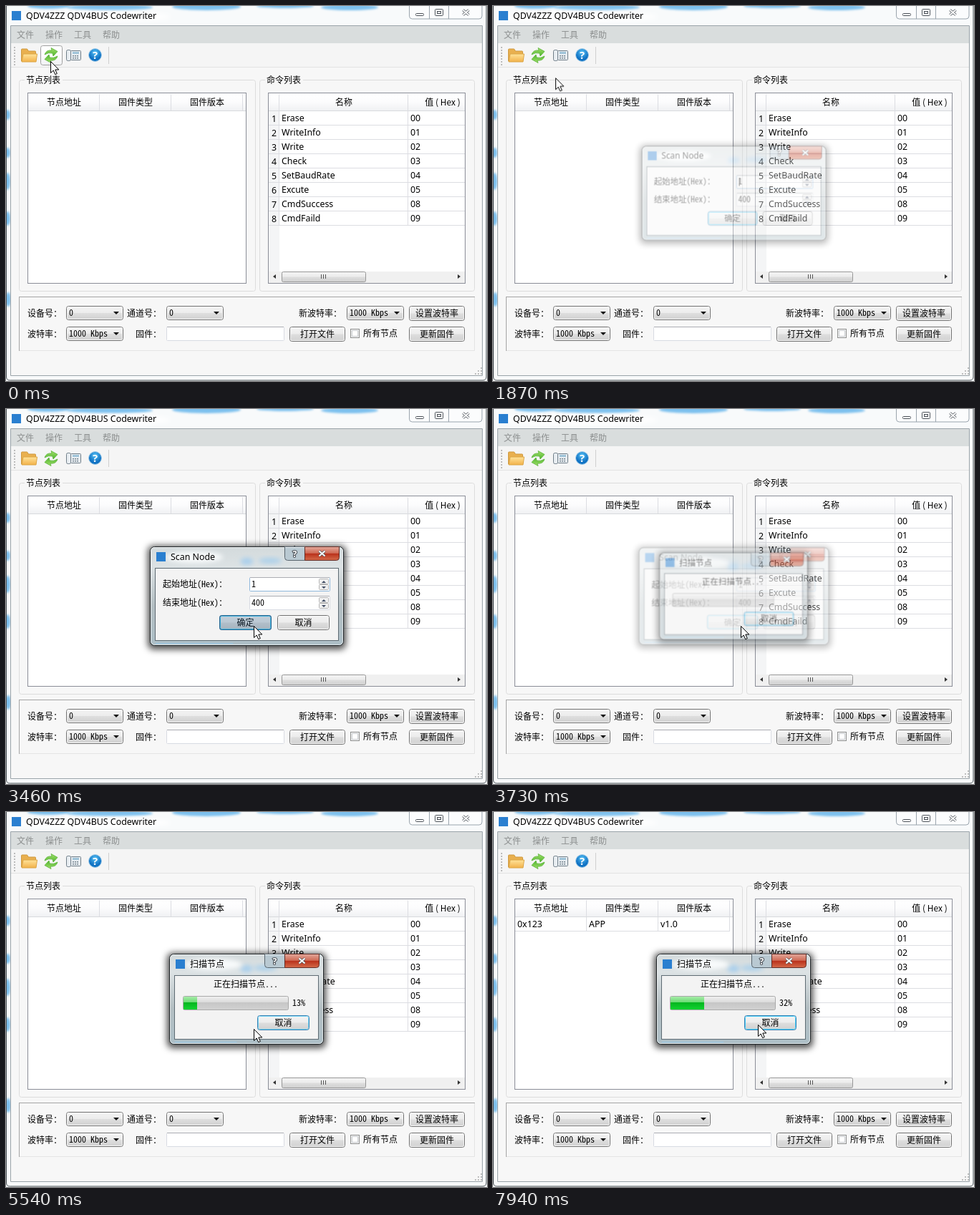
Animation of 672 by 524 pixels, one loop 8 s. Source, as an HTML page:

```html
<!DOCTYPE html>
<html lang="zh-CN">
<head>
<meta charset="utf-8">
<title>Node scan</title>
<style>
html, body { margin: 0; width: 100%; height: 100%; overflow: hidden; background: #fff; }
svg { display: block; width: 672px; height: 524px; }
text { font: 12.4px "Noto Sans", "Noto Sans CJK SC", sans-serif; fill: #000; white-space: pre; }
text.cn { font: 12px "Noto Sans CJK SC", "Noto Sans CJK", sans-serif; }
text.mono { font: 12px "Noto Sans Mono CJK SC", "Noto Sans CJK SC", "Noto Sans Mono", monospace; }
text.off { fill: #8c8f8f; }
text.mid { text-anchor: middle; }

.active, .hover, .pressed, .scan, .busy, .row, .caret, .down, .pulse, #cursor { animation: 8s linear infinite; }
.active { animation-name: active; }
.hover { animation-name: hover; }
.pressed { animation-name: pressed; }
.scan { animation-name: scan; transform-origin: 336px 261px; }
.busy { animation-name: busy; transform-origin: 336px 261px; }
.row { animation-name: row; }
.caret { animation-name: caret; }
.down { animation-name: down; }
.pulse { animation-name: pulse; }
#cursor { animation-name: cursor; }

@keyframes active {
  0%, 19.37% { opacity: 0; }
  19.375%, 22% { opacity: 1; }
  22.01%, 100% { opacity: 0; }
}
@keyframes hover { 0%, 19.37% { opacity: 1; } 19.375%, 100% { opacity: 0; } }
@keyframes pressed {
  0%, 19.37% { opacity: 0; }
  19.375%, 21.87% { opacity: 1; }
  21.875%, 100% { opacity: 0; }
}
@keyframes scan {
  0%, 22.2% { opacity: 0; transform: scale(.92); }
  25.3%, 44.1% { opacity: 1; transform: none; }
  47.9%, 100% { opacity: 0; transform: scale(.97); }
}
@keyframes busy {
  0%, 45.2% { opacity: 0; transform: scale(.92); }
  48.1%, 100% { opacity: 1; transform: none; }
}
@keyframes row { 0%, 93.1% { opacity: 0; } 93.12%, 100% { opacity: 1; } }
@keyframes caret {
  0%, 26.74% { opacity: 1; }
  26.75%, 33.39% { opacity: 0; }
  33.4%, 39.99% { opacity: 1; }
  40%, 100% { opacity: 0; }
}
@keyframes down {
  0%, 42.49% { opacity: 0; }
  42.5%, 44% { opacity: 1; }
  44.01%, 100% { opacity: 0; }
}
@keyframes pulse { 0%, 48% { opacity: 1; } 54% { opacity: .5; } 61% { opacity: 1; } 67% { opacity: .5; } 72.75%, 100% { opacity: 1; } }
@keyframes cursor {
  0%, 8.62% { transform: translate(62px, 77px); }
  9%, 22.2% { transform: translate(62px, 74px); }
  27.5% { transform: translate(174px, 191px); }
  32% { transform: translate(300px, 273px); }
  35%, 95.1% { transform: translate(346px, 303px); }
  99.25%, 100% { transform: translate(370px, 297px); }
}
</style>
</head>
<body>
<svg id="stage" viewBox="0 0 672 524">
  <defs>
    <linearGradient id="face" x2="0" y2="1">
      <stop stop-color="#f4f4f4"/><stop offset=".48" stop-color="#ececec"/>
      <stop offset=".52" stop-color="#dedede"/><stop offset="1" stop-color="#d0d0d0"/>
    </linearGradient>
    <linearGradient id="head" x2="0" y2="1">
      <stop stop-color="#fff"/><stop offset=".5" stop-color="#fcfcfd"/><stop offset="1" stop-color="#f0f1f3"/>
    </linearGradient>
    <linearGradient id="glass" x2="0" y2="1">
      <stop stop-color="#d3dadc"/><stop offset=".2" stop-color="#dce2e4"/>
      <stop offset=".6" stop-color="#b4bfc3"/><stop offset="1" stop-color="#adbfc7"/>
    </linearGradient>
    <linearGradient id="lit">
      <stop stop-color="#c9dbe6"/><stop offset=".45" stop-color="#d9e4ea"/><stop offset="1" stop-color="#a9bac4"/>
    </linearGradient>
    <linearGradient id="menu" x2="0" y2="1">
      <stop stop-color="#f8f9fb"/><stop offset=".45" stop-color="#e8ebf2"/><stop offset="1" stop-color="#d9dee9"/>
    </linearGradient>
    <linearGradient id="red" x2="0" y2="1">
      <stop stop-color="#e3a89b"/><stop offset=".47" stop-color="#cf6a55"/>
      <stop offset=".5" stop-color="#b9301a"/><stop offset="1" stop-color="#d46b4a"/>
    </linearGradient>
    <linearGradient id="dip" x2="0" y2="1"><stop stop-color="#a2a4a2"/><stop offset="1" stop-color="#d4d6d4"/></linearGradient>
    <linearGradient id="green" x2="0" y2="1">
      <stop stop-color="#a8eba9"/><stop offset=".42" stop-color="#6bdc74"/>
      <stop offset=".46" stop-color="#04b51f"/><stop offset="1" stop-color="#12d330"/>
    </linearGradient>
    <linearGradient id="track" x2="0" y2="1">
      <stop stop-color="#f0f0f0"/><stop offset=".42" stop-color="#dcdcdc"/>
      <stop offset=".46" stop-color="#c6c6c6"/><stop offset="1" stop-color="#d2d2d2"/>
    </linearGradient>
    <linearGradient id="folder" x2="0" y2="1"><stop stop-color="#ffe39a"/><stop offset="1" stop-color="#f2b24a"/></linearGradient>
    <linearGradient id="leaf" x2="0" y2="1"><stop stop-color="#a4e06c"/><stop offset="1" stop-color="#4fb52e"/></linearGradient>
    <radialGradient id="ball" cy=".3"><stop stop-color="#57c1f5"/><stop offset="1" stop-color="#1173c4"/></radialGradient>
    <filter id="soft" x="-50%" y="-50%" width="200%" height="200%"><feGaussianBlur stdDeviation="3"/></filter>
    <filter id="mist" x="-50%" y="-50%" width="200%" height="200%"><feGaussianBlur stdDeviation="1.5"/></filter>
    <filter id="shade" x="-15%" y="-25%" width="130%" height="150%"><feGaussianBlur stdDeviation="5"/></filter>
    <clipPath id="edge"><path d="M0 0H672V524H0ZM7 28V516H666V28Z" clip-rule="evenodd"/></clipPath>
  </defs>
</svg>
<script>
const LOOP = 8000, SCAN_START = 3690, MS_PER_PERCENT = 132.5, BAR = 146;

const rect = (x, y, w, h, fill, stroke, r = 0, extra = '') =>
  `<rect x="${x}" y="${y}" width="${w}" height="${h}" rx="${r}" fill="${fill}"${stroke ? ` stroke="${stroke}"` : ''} ${extra}/>`;
// Outlined box whose one-pixel border covers the outermost pixels
const box = (x, y, w, h, fill, stroke, r) => rect(x + .5, y + .5, w - 1, h - 1, fill, stroke, r);
const path = (d, fill = 'none', stroke = 'none', extra = '') => `<path d="${d}" fill="${fill}" stroke="${stroke}" ${extra}/>`;
const text = (x, y, s, cls = '') => `<text x="${x}" y="${y}" class="${cls}">${s}</text>`;
const group = (cls, ...parts) => `<g class="${cls}">${parts.join('')}</g>`;
const hline = (x, y, w, c) => rect(x, y, w, 1, c);
const vline = (x, y, h, c) => rect(x, y, 1, h, c);
const blob = (x, y, rx, ry, c, filter = 'soft') =>
  `<ellipse cx="${x}" cy="${y}" rx="${rx}" ry="${ry}" fill="${c}" filter="url(#${filter})"/>`;
const tri = (x, y, s, c = '#111') => path(`M${x - s} ${y}h${2 * s}l${-s} ${s}z`, c);
const appIcon = (x, y) => rect(x, y, 13, 13, '#2a7fd0');

const button = (x, y, w, label, focus) =>
  box(x, y, w, 21, 'url(#face)', focus ? '#3c7fb1' : '#707070', 3) +
  rect(x + 1.5, y + 1.5, w - 3, 18, 'none', focus ? '#48d0fa' : '#fafafa', 2, focus ? 'class="pulse"' : '') +
  text(x + w / 2, y + 15, label, 'cn mid');
const combo = (x, y, label) =>
  box(x, y, 80, 20, 'url(#face)', '#707070', 3) + rect(x + 1.5, y + 1.5, 77, 17, 'none', '#f8f8f8', 2) +
  text(x + 4, y + 14, label, 'mono') + tri(x + 66 + 4, y + 8, 4);
const field = (x, y, w, h, edge = '#d8dbe2') =>
  box(x, y, w, h, '#fff', edge, 1) + hline(x + 1, y, w - 2, '#abadb3');
const spin = (y, value, edge) =>
  field(340, y, 113, 20, edge) + text(343, y + 14, value, 'mono') +
  [0, 8].map(d => box(437, y + 2 + d, 14, 8, '#f1f1f1', '#b5b5b5', 1)).join('') +
  path(`M441 ${y + 8}h6l-3 -3z`, '#3f4b62') + tri(444, y + 13, 3, '#3f4b62');
const cross = (x, y) => {
  const d = `M${x - 4} ${y - 3.5}l8 7m0 -7l-8 7`;
  return path(d, 'none', '#4b5158', 'stroke-width="3.6"') + path(d, 'none', '#fff', 'stroke-width="2"');
};
const groupBox = (x, w, label) =>
  box(x, 103, w, 296, 'none', '#dcdcdc', 3) + rect(x + 8, 98, 53, 10, '#f7f7f7') + text(x + 10, 108, label, 'cn');

function frame() {
  const patches = [[60, 0, 30, 4], [145, 2, 60, 4], [280, 1, 48, 5], [390, 0, 40, 3], [480, 2, 40, 4],
    [2, 152, 4, 7], [2, 205, 4, 7], [2, 245, 4, 12], [2, 297, 4, 10], [3, 410, 4, 10]];
  const caption = (edge, close) =>
    path('M563.5 0V14q0 4 4 4H661q4 0 4 -4V0', '#ffffff60', edge) +
    (close ? path('M619 0V18H661q4 0 4 -4V0z', 'url(#red)', '#642f29') : '') +
    vline(591, 0, 18, edge) + vline(618, 0, 18, edge) +
    box(572, 10, 12, 4, '#fff', '#4b5158', 1) + box(599, 4, 12, 10, '#fff', '#4b5158', 1) + box(602, 7, 6, 4, '#eee', '#4b5158') +
    cross(642.5, 9);
  return rect(0, 0, 672, 524, '#f8fafb') +
    `<g clip-path="url(#edge)">` + patches.map(p => blob(...p, '#7cc0ee', 'mist')).join('') + blob(120, 15, 110, 7, '#fff') + '</g>' +
    caption('#9aa4ad') +
    group('active', `<g clip-path="url(#edge)">`, rect(0, 0, 672, 524, 'url(#lit)'), blob(120, 14, 110, 8, '#f4f8fa'),
      blob(275, 3, 35, 3, '#a4cbe2'), blob(480, 4, 45, 4, '#8ea4b2'), '</g>', caption('#59656e', true)) +
    path('M.5 0V518q0 5 5 5H666q5 0 5 -5V0', 'none', '#4a5257') + path('M6.5 516.5V27.5H665.5V516.5Z', '#f7f7f7', '#9aa3a9') +
    appIcon(8, 7) + text(28, 18, 'QDV4ZZZ QDV4BUS Codewriter');
}

function toolbar() {
  const menu = cls => ['文件', '操作', '工具', '帮助'].map((s, i) => text(15 + 40 * i, 45, s, cls)).join('');
  const arrow = path('M54 68q2 -7 10 -6l-1 -3.500l9 5l-6 6.500l-1 -4q-6 -1.500 -11 2z', 'url(#leaf)', '#58b336', 'stroke-width=".8"');
  let dots = '';
  for (let y = 57; y < 83; y += 4) dots += rect(11, y, 2, 2, '#bcbcbc');
  return rect(7, 28, 658, 24, '#d9dddd') + menu('cn off') +
    group('active', rect(7, 28, 658, 24, 'url(#menu)'), menu('cn')) +
    rect(7, 52, 658, 33, '#f5f5f5') + hline(7, 85, 658, '#e2e2e2') + dots + vline(143, 57, 24, '#cfcfcf') +
    group('hover', box(48, 55, 31, 28, 'url(#head)', '#a0a0a0', 3)) +
    group('pressed', box(48, 55, 31, 28, 'url(#dip)', '#676967', 3)) +
    path('M21.5 77V61q0 -1 1 -1h7l2 3h9q1 0 1 1V77z', '#e9b04f', '#cf9a40') +
    path('M22 78l2 -11H43.500l-1.500 11z', 'url(#folder)', '#dba445') +
    arrow + `<g transform="rotate(180 63 69)">${arrow}</g>` +
    box(84, 61, 7, 16, '#e9eef2', '#6f7d88', 2) + box(90, 62, 15, 14, '#e8edf1', '#6f7d88', 1) +
    rect(93, 64, 9, 3, '#9fc3d8') + [0, 3, 6].map(d => rect(93 + d, 69, 2, 1.5, '#73828d') + rect(93 + d, 72, 2, 1.5, '#73828d')).join('') +
    '<circle cx="124.5" cy="68.5" r="9" fill="url(#ball)" stroke="#a9cfe8"/>' +
    '<text x="124.5" y="74" class="mid" style="font-size:15px;font-weight:700;fill:#fff">?</text>';
}

function tables() {
  const grid = '#dcdde2', edge = '#8b8e98';
  const cmds = 'Erase WriteInfo Write Check SetBaudRate Excute CmdSuccess CmdFaild'.split(' ');
  const codes = '00 01 02 03 04 05 08 09'.split(' ');
  const rows = cmds.map((name, i) => {
    const y = 147 + 20 * i;
    return text(374.5, y + 15, i + 1, 'mid') + text(385, y + 14, name) + text(565, y + 14, codes[i]) + hline(367, y + 19, 274, grid);
  });
  return groupBox(18, 331, '节点列表') + box(30, 121, 306, 267, '#fff', edge) + rect(31, 122, 304, 24, 'url(#head)') +
    hline(31, 146, 304, '#d8dadd') +
    ['节点地址', '固件类型', '固件版本'].map((s, i) => text(81 + 100 * i, 139, s, 'cn mid') + vline(130 + 100 * i, 123, 23, grid)).join('') +
    group('row', ['0x123', 'APP', 'v1.0'].map((s, i) => text(34 + 100 * i, 161, s) + vline(130 + 100 * i, 147, 20, grid)).join(''),
      hline(31, 166, 300, grid)) +
    groupBox(354, 301, '命令列表') + box(366, 121, 276, 267, '#fff', edge) + rect(367, 122, 274, 24, 'url(#head)') +
    rect(367, 147, 15, 224, '#f4f5f6') + hline(367, 146, 274, '#d8dadd') + rows.join('') +
    vline(381, 123, 184, grid) + vline(561, 123, 184, grid) +
    text(472, 139, '名称', 'cn mid') + text(610, 139, '值 ( Hex )', 'cn mid') +
    rect(367, 371, 274, 16, '#f0f0f0') + box(385, 371, 118, 15, 'url(#face)', '#979797', 2) +
    [440, 443, 446].map(x => vline(x, 375, 6, '#555')).join('') +
    path('M377 375v6l-4 -3z', '#333') + path('M631 375v6l4 -3z', '#333');
}

function controls() {
  let grip = '';
  for (let i = 0; i < 3; i++) for (let j = 0; j <= i; j++) grip += rect(663 - 4 * j, 505 + 4 * i, 2, 2, '#bfbfbf');
  return box(18, 406, 637, 76, 'none', '#e4e4e4') + hline(18, 406, 637, '#a5a5a5') + vline(18, 406, 76, '#a5a5a5') +
    [[30, 434, '设备号：'], [169, 434, '通道号：'], [409, 434, '新波特率：'], [30, 463, '波特率：'], [181, 463, '固件：'], [499, 462, '所有节点']]
      .map(([x, y, s]) => text(x, y, s, 'cn')).join('') +
    combo(84, 419, '0') + combo(224, 419, '0') + combo(476, 419, '1000 Kbps') + combo(84, 448, '1000 Kbps') +
    field(224, 448, 165, 20) + button(563, 419, 78, '设置波特率') + button(396, 448, 78, '打开文件') + button(563, 448, 78, '更新固件') +
    box(481, 451, 13, 13, '#f4f4f4', '#8e8f8f') + box(483, 453, 9, 9, '#fff', '#c9ccd0') + grip;
}

function dialog(x, y, w, h, title, titleClass, body) {
  const bx = x + w - 83;
  return rect(x - 3, y - 1, w + 6, h + 6, '#000000b0', '', 8, 'filter="url(#shade)"') +
    box(x, y, w, h, 'url(#glass)', '#1f2528', 6) + rect(x + 1.5, y + 1.5, w - 3, h - 3, 'none', '#ffffffa0', 5) +
    blob(x + w / 2, y + 21, 9, 5, '#a9cfec') + blob(x + w * .62, y + 20, 16, 4, '#acd0ea') + blob(x + 62, y + 15, 40, 8, '#f8fafb') +
    hline(x + 8, y + h - 4, w * .4, '#9ccbe9') +
    path(`M${bx + .5} ${y + .5}v15q0 4 4 4h24v-19z`, '#b9c9d2', '#59656e') + hline(bx + 1, y + 1, 27, '#eef4f7') +
    path(`M${bx + 28.5} ${y + .5}v19h44q4 0 4 -4v-15z`, 'url(#red)', '#642f29') +
    `<text x="${bx + 14.5}" y="${y + 15}" class="mid" style="font-weight:700;fill:#fff;stroke:#4b5158;stroke-width:2;paint-order:stroke">?</text>` +
    cross(bx + 52.5, y + 10) +
    box(x + 7, y + 30, w - 14, h - 37, '#f3f3f3', '#5e6b73') +
    appIcon(x + 9, y + 8) + text(x + 29, y + 19, title, titleClass) + body;
}

const scanBody = text(219, 249, '起始地址(Hex)：', 'mono') + text(219, 275, '结束地址(Hex)：', 'mono') +
  spin(235, '1', '#8fb8dc') + spin(261, '400') + group('caret', vline(344, 239, 12, '#000')) +
  button(298, 288, 73, '确定', true) + group('down', box(298, 288, 73, 21, '#2c628b40', '#2c628b', 3)) + button(379, 288, 73, '取消');

const busyBody = text(335, 245, '正在扫描节点...', 'mono mid') +
  box(247, 257, 148, 20, 'url(#track)', '#a9a9a9', 2) +
  '<rect id="fill" x="248" y="258" height="18" fill="url(#green)"/>' +
  '<text id="percent" x="409" y="271" class="mono mid"></text>' + button(351, 284, 73, '取消', true);

const stage = document.getElementById('stage');
stage.insertAdjacentHTML('beforeend', frame() + toolbar() + tables() + controls() +
  group('scan', dialog(201, 192, 271, 139, 'Scan Node', '', scanBody)) +
  group('busy', dialog(228, 198, 216, 127, '扫描节点', 'cn', busyBody)) +
  `<g id="cursor">${path('M.5 .5V16.5l3.7 -3.5l2.5 5.7l2.6 -1.2l-2.5 -5.5h5z', '#fff', '#000')}</g>`);

const fill = document.getElementById('fill'), percent = document.getElementById('percent');
const start = performance.now();
function tick() {
  const t = (performance.now() - start) % LOOP;
  const p = Math.max(0, Math.floor((t - SCAN_START) / MS_PER_PERCENT));
  fill.setAttribute('width', Math.round(p * BAR / 100));
  percent.textContent = p ? p + '%' : '';
  requestAnimationFrame(tick);
}
tick();
</script>
</body>
</html>
```
